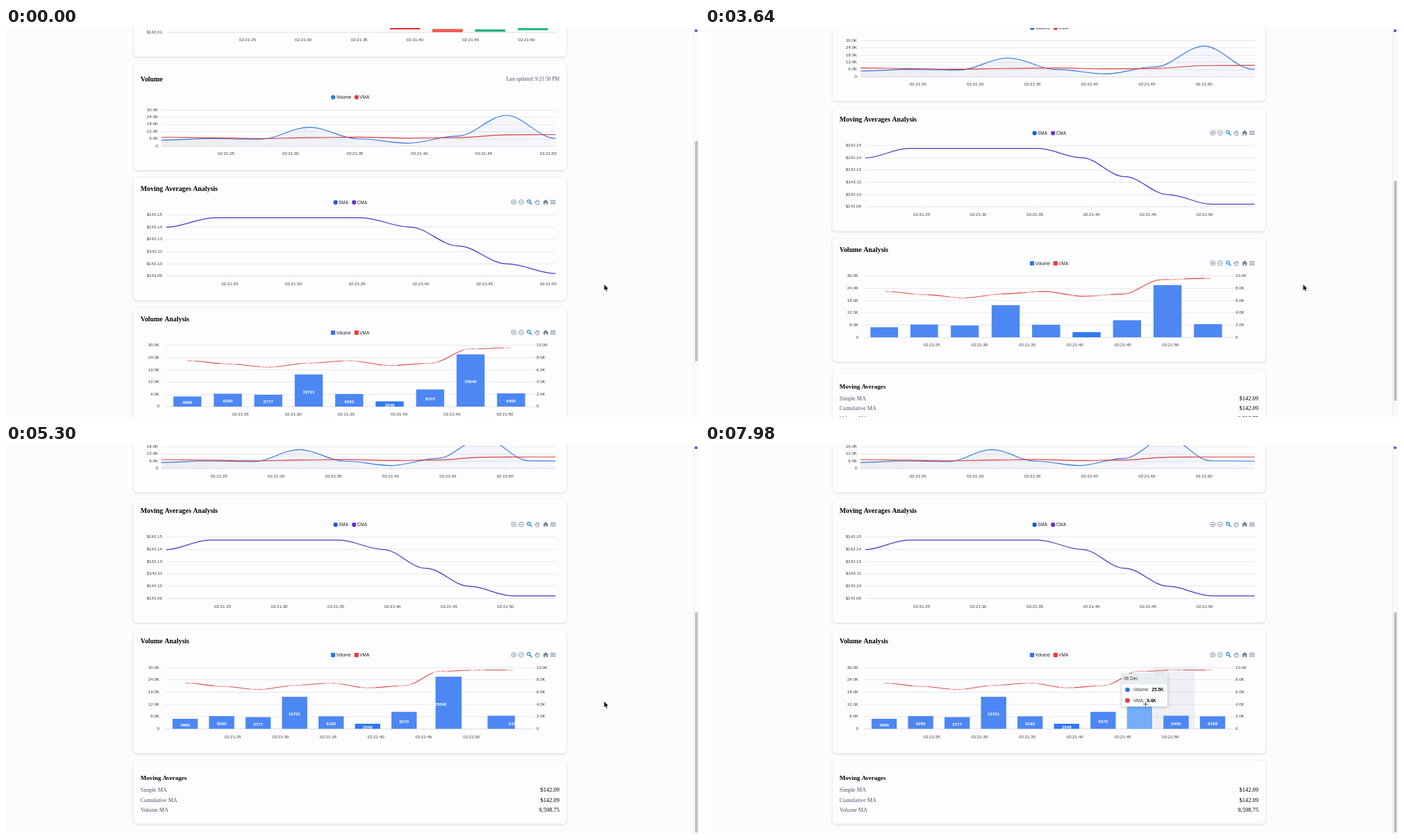
Recreate the animation shown at these times as an HTML page with a canvas. Size 998x561 px, loop 8 s.

```html
<!DOCTYPE html>
<html lang="en">
<head>
<meta charset="utf-8">
<title>Market dashboard</title>
<style>
  html, body { margin: 0; width: 100%; height: 100%; overflow: hidden; background: #fcfcfe; }
  canvas { display: block; width: 998px; height: 561px; }
</style>
</head>
<body>
<canvas id="stage" width="998" height="561"></canvas>
<script>
const ctx = document.getElementById('stage').getContext('2d');
const LOOP = 8000, UPDATE = 3540;
const SANS = '"Liberation Sans", Arial, sans-serif';
const SERIF = '"Liberation Serif", "Times New Roman", serif';
const BLUE = '#2f74ea', RED = '#ea3a36', INK = '#373d3f', GRID = '#e3e3e9';

const volumes = [4966, 6290, 5777, 15721, 6182, 2548, 8370, 25548, 6455, 6189];
const volumeAvg = [7480, 6950, 6430, 7090, 7490, 6700, 7060, 9400, 9600, 9599];
const averageY = [287.3, 273.5, 273.5, 273.5, 273.5, 287, 314.3, 340.2, 354, 354];

const clamp = v => Math.max(0, Math.min(1, v));
const span = (t, start, length) => clamp((t - start) / length);
const mix = (a, b, p) => a + (b - a) * p;

// ---- drawing helpers ----
function text(str, x, y, { size = 6.2, align = 'left', color = INK, weight = 'normal', family = SANS } = {}) {
  ctx.font = `${weight} ${size}px ${family}`;
  ctx.textAlign = align;
  ctx.fillStyle = color;
  ctx.fillText(str, x, y + size * 0.355);
}

function rect(x, y, w, h, color) {
  ctx.fillStyle = color;
  ctx.fillRect(x, y, w, h);
}

function dot(x, y, r, color) {
  ctx.fillStyle = color;
  ctx.beginPath();
  ctx.arc(x, y, r, 0, 7);
  ctx.fill();
}

function box(x, y, w, h, r, color) {
  ctx.fillStyle = color;
  ctx.beginPath();
  ctx.roundRect(x, y, w, h, r);
  ctx.fill();
}

function shadowBox(x, y, w, h, r, color, strength, blur) {
  ctx.save();
  ctx.shadowColor = `rgba(30,30,50,${strength})`;
  ctx.shadowBlur = blur;
  ctx.shadowOffsetY = 0.8;
  box(x, y, w, h, r, color);
  ctx.restore();
}

const card = (top, bottom) => shadowBox(183.5, top, 623.5, bottom - top, 5, '#fdfdff', 0.2, 3);
const title = (str, y, size = 9.9) =>
  text(str, 193.7, y, { size, weight: 'bold', family: SERIF, color: '#000' });

function stroke(path, color, width) {
  ctx.strokeStyle = color;
  ctx.lineWidth = width;
  ctx.stroke(path);
}

// Smooth line whose tangent is horizontal at every point.
function curve(points) {
  const path = new Path2D();
  points.forEach(([x, y], i) => {
    if (!i) return path.moveTo(x, y);
    const [px, py] = points[i - 1], reach = (x - px) * 0.35;
    path.bezierCurveTo(px + reach, py, x - reach, y, x, y);
  });
  return path;
}

function spread(ys, count, left, right) {
  return ys.slice(0, count).map((y, i) => [left + (right - left) * i / (count - 1), y]);
}

function morph(from, to, p) {
  return to.map(([x, y], i) => {
    const [fx, fy] = from[Math.min(i, from.length - 1)];
    return [mix(fx, x, p), mix(fy, y, p)];
  });
}

function gridRows(left, right, top, step) {
  for (let i = 0; i < 6; i++) rect(left, top + step * i - 0.35, right - left, 0.8, i < 5 ? GRID : '#d9d9df');
}

function timeLabels(first, step, y, axisY) {
  for (let i = 0; i < 6; i++) {
    const x = first + step * i;
    rect(x - 0.3, axisY, 0.6, 3, '#dedee4');
    text('02:21:' + (25 + 5 * i), x, y, { align: 'center' });
  }
}

function valueLabels(labels, x, top, step, align) {
  labels.forEach((label, i) => text(label, x, top + step * i, { align }));
}

const thousands = max => [5, 4, 3, 2, 1, 0].map(i => i ? (max / 5 * i).toFixed(1) + 'K' : '0');

function legend(y, items, square) {
  for (const [label, x, color] of items) {
    if (square) box(x - 3.1, y - 3.1, 6.2, 6.2, 0.8, color);
    else dot(x, y, 3.1, color);
    text(label, x + 4.5, y, { size: 6.4, color: '#222' });
  }
}

function toolbar(y) {
  const grey = '#6e8192', blue = '#1789dd';
  const path = d => { const p = new Path2D(); p.addPath(new Path2D(d), new DOMMatrix([1, 0, 0, 1, 0, y])); return p; };
  for (const x of [731.3, 742]) {
    const ring = new Path2D();
    ring.arc(x, y, 3.4, 0, 7);
    stroke(ring, grey, 0.8);
    rect(x - 1.8, y - 0.4, 3.6, 0.8, grey);
  }
  rect(730.9, y - 1.8, 0.8, 3.6, grey);
  const lens = new Path2D();
  lens.arc(752.9, y - 0.9, 2.2, 0, 7);
  stroke(lens, blue, 1.1);
  stroke(path('M754.6 .8L757.4 3.6'), blue, 1.4);
  stroke(path('M763.2 .8V-2.4M764.7 0V-3.4M766.2 0V-3.2M767.7 .4V-2.2M763.2 1L761.7 -.2L763.8 3.5H767L768 .3'), grey, 0.8);
  ctx.fillStyle = grey;
  ctx.fill(path('M773 .2L777.2 -3.8L781.4 .2H780.2V3.6H778.2V1H776.2V3.6H774.2V.2Z'));
  for (const dy of [-2.7, -0.4, 1.9]) rect(784, y + dy, 7.6, 1, grey);
}

// ---- page sections ----
function candleCard() {
  card(-60, 41.5);
  rect(232, 5.8, 562, 0.8, '#d9d9df');
  text('$142.01', 225, 5.5, { align: 'right' });
  timeLabels(347.8, 80.35, 17, 6.5);
  rect(553, 0, 43.5, 2, '#e8332f');
  rect(614, 1.4, 44, 4.6, '#ee5a56');
  rect(675.5, 2, 43.5, 3.4, '#22b07d');
  rect(737, 0, 43.5, 3.4, '#2fba88');
}

function volumeCard(t, fresh) {
  card(52, 205);
  title('Volume', 73.6);
  text('Last updated: 9:21:50 PM', 797, 73.3, { size: 7.35, align: 'right', family: SERIF, color: '#4b5563' });
  legend(99.8, [['Volume', 471.2, BLUE], ['VMA', 504.8, RED]]);
  valueLabels(thousands(30), 219, 117.4, 10.4, 'right');
  gridRows(224, 792, 118.2, 10.45);
  fresh ? timeLabels(306.7, 82.4, 181, 170.5) : timeLabels(317, 92.76, 181, 170.5);

  const p = span(t, UPDATE, 2900), toY = v => 170.5 - v * 52.3 / 30000;
  const line = values => {
    const ys = values.map(toY), before = spread(ys, 9, 224, 791.5);
    return curve(fresh ? morph(before, spread(ys, 10, 224, 791.5), p) : before);
  };
  const volumeLine = line(volumes), area = new Path2D(volumeLine);
  area.lineTo(791.5, 170.5);
  area.lineTo(224, 170.5);
  const shade = ctx.createLinearGradient(224, 0, 791, 0);
  shade.addColorStop(0, 'rgba(120,140,160,.13)');
  shade.addColorStop(0.6, 'rgba(120,145,190,.08)');
  shade.addColorStop(1, 'rgba(120,145,210,.06)');
  ctx.fillStyle = shade;
  ctx.fill(area);
  stroke(volumeLine, '#3576dc', 1.15);
  stroke(line(volumeAvg), '#dd3d40', 1.15);
}

function averagesCard(fresh) {
  card(215.5, 393);
  title('Moving Averages Analysis', 231.2);
  legend(251.4, [['SMA', 474.6, '#2255dc'], ['CMA', 501.2, '#682cd8']]);
  toolbar(251);
  valueLabels(['15', '14', '13', '11', '10', '09'].map(c => '$142.' + c), 225, 268.6, 17.7, 'right');
  gridRows(231, 792, 269.2, 17.7);
  fresh ? timeLabels(312, 81.5, 369, 358) : timeLabels(322.2, 91.75, 369, 358);
  stroke(curve(spread(averageY, fresh ? 10 : 9, 230.8, 791.5)), '#5430ca', 1.25);
}

const oldCenter = i => 261.2 + 58.27 * i, newCenter = i => 258 + 52.55 * i;
const barHeight = v => v * 88.5 / 30000;
const BASE = 546;

// Bars slide to their new slots one after another, later ones with growing delay.
function barShape(i, t, fresh) {
  if (!fresh) return [oldCenter(i), 40.4];
  const p = span(t, 3500 + 25.1 * i * i, 800);
  const from = i < 9 ? oldCenter(i) - 3 : newCenter(9) + 90;
  return [mix(from, newCenter(i), p), mix(40.4, 36.4, p)];
}

function analysisCard(t, fresh, hovered, banded) {
  card(403.5, 581.3);
  title('Volume Analysis', 419.2);
  legend(439.3, [['Volume', 471, BLUE], ['VMA', 504.8, RED]], true);
  toolbar(439);
  valueLabels(thousands(30), 221, 457, 17.65, 'right');
  valueLabels(thousands(10), 764, 457, 17.65, 'left');
  gridRows(229, 761.5, 457.5, 17.7);
  fresh ? timeLabels(326.5, 68.75, 556.8, BASE) : timeLabels(337.5, 76.2, 556.8, BASE);
  if (banded >= 0) rect(newCenter(banded) - 33, 457.5, 60, 88.5, 'rgba(60,80,90,.07)');

  const count = fresh ? 10 : 9, center = fresh ? newCenter : oldCenter;
  ctx.save();
  ctx.beginPath();
  ctx.rect(229, 440, 533.5, BASE - 440);
  ctx.clip();
  for (let i = 0; i < count; i++) {
    const [x, w] = barShape(i, t, fresh), h = barHeight(volumes[i]);
    rect(x - w / 2, BASE - h, w, h, i === hovered ? '#74adf9' : i === 5 ? '#3279f0' : '#4d87f3');
  }
  ctx.restore();

  const toPoints = (n, at) => volumeAvg.slice(0, n).map((v, i) => [at(i), BASE - v * 88.5 / 10000]);
  const before = toPoints(9, oldCenter);
  stroke(curve(fresh ? morph(before, toPoints(10, newCenter), span(t, UPDATE, 380)) : before), '#df4a48', 1.1);

  // White value labels only show where they cross a bar or the line.
  const label = { align: 'center', weight: 'bold', color: '#fff' };
  for (let i = 0; i < count; i++) {
    text(volumeAvg[i].toFixed(2), center(i), BASE - volumeAvg[i] * 88.5 / 10000, { ...label, color: '#fdfdff' });
    if (!fresh || t > UPDATE + 800) text(volumes[i], center(i), BASE - barHeight(volumes[i]) / 2 + 1.5, label);
  }
}

function summaryCard() {
  card(591.5, 683);
  title('Moving Averages', 616.3, 9);
  [['Simple MA', '$142.09'], ['Cumulative MA', '$142.09'], ['Volume MA', '9,598.75']].forEach(([name, value], i) => {
    const y = 633.7 + 14.5 * i;
    text(name, 193.7, y, { size: 8.15, family: SERIF, color: '#4b5563' });
    text(value, 797, y, { size: 8.5, family: SERIF, align: 'right', color: '#000' });
  });
}

// ---- fixed overlay ----
function scrollbar(scroll) {
  rect(990, 0, 8, 561, '#fafafb');
  rect(990, 0, 0.7, 561, '#e6e6ea');
  box(992.2, 162.8 + scroll * 0.573, 4.2, 318, 2.1, '#c0c0c2');
  dot(993.8, 4, 2.1, '#5448cf');
}

function tooltip(index, x) {
  const left = x - 34.3, kilo = v => (v / 1000).toFixed(1) + 'K';
  shadowBox(left, 330.3, 65.7, 47, 2.5, '#fcfcfe', 0.3, 4);
  box(left, 330.3, 65.7, 13.8, [2.5, 2.5, 0, 0], '#e9edef');
  rect(left, 344, 65.7, 0.6, '#dcdfe2');
  text('06 Dec', left + 3, 337.2, { size: 6.4 });
  [['Volume:', volumes[index], BLUE, 43.2], ['VMA:', volumeAvg[index], RED, 36]].forEach(([name, value, color, at], i) => {
    const y = 353 + 15.4 * i;
    dot(left + 8.2, y, 3.3, color);
    text(name, left + 16.6, y, { size: 6.4 });
    text(kilo(value), left + at, y, { size: 6.4, weight: 'bold', color: '#111' });
  });
}

function pointer(x, y, cross) {
  const path = new Path2D(cross
    ? `M${x - 3.5} ${y}H${x + 3.5}M${x} ${y - 3.5}V${y + 3.5}`
    : `M${x - 0.5} ${y - 5}v8.2l1.9 -1.7l1.3 3l1.3 -.6l-1.3 -2.9h2.6z`);
  stroke(path, '#fff', cross ? 2 : 1.2);
  if (cross) return stroke(path, '#333', 0.8);
  ctx.fillStyle = '#111';
  ctx.fill(path);
}

const mouseX = t => mix(862, 634.5, span(t, 7440, 530));
const barUnder = x => x < 757 ? Math.min(9, Math.round((x - newCenter(0)) / 52.55)) : -1;

function draw(t) {
  const scroll = 136.5 * (1 - (1 - span(t, 3357, 800)) ** 3);
  const fresh = t >= UPDATE, x = mouseX(t), hovered = barUnder(x);
  rect(0, 0, 998, 561, '#fcfcfe');
  ctx.save();
  ctx.translate(0, -scroll);
  candleCard();
  volumeCard(t, fresh);
  averagesCard(fresh);
  analysisCard(t, fresh, hovered, barUnder(mouseX(t - 100)));
  summaryCard();
  ctx.restore();
  scrollbar(scroll);
  if (hovered >= 0) tooltip(hovered, x);
  pointer(x, mix(375, 373.8, span(t, 7440, 530)), hovered >= 0);
}

const began = performance.now();
function tick() {
  draw((performance.now() - began) % LOOP);
  requestAnimationFrame(tick);
}
tick();
</script>
</body>
</html>
```
